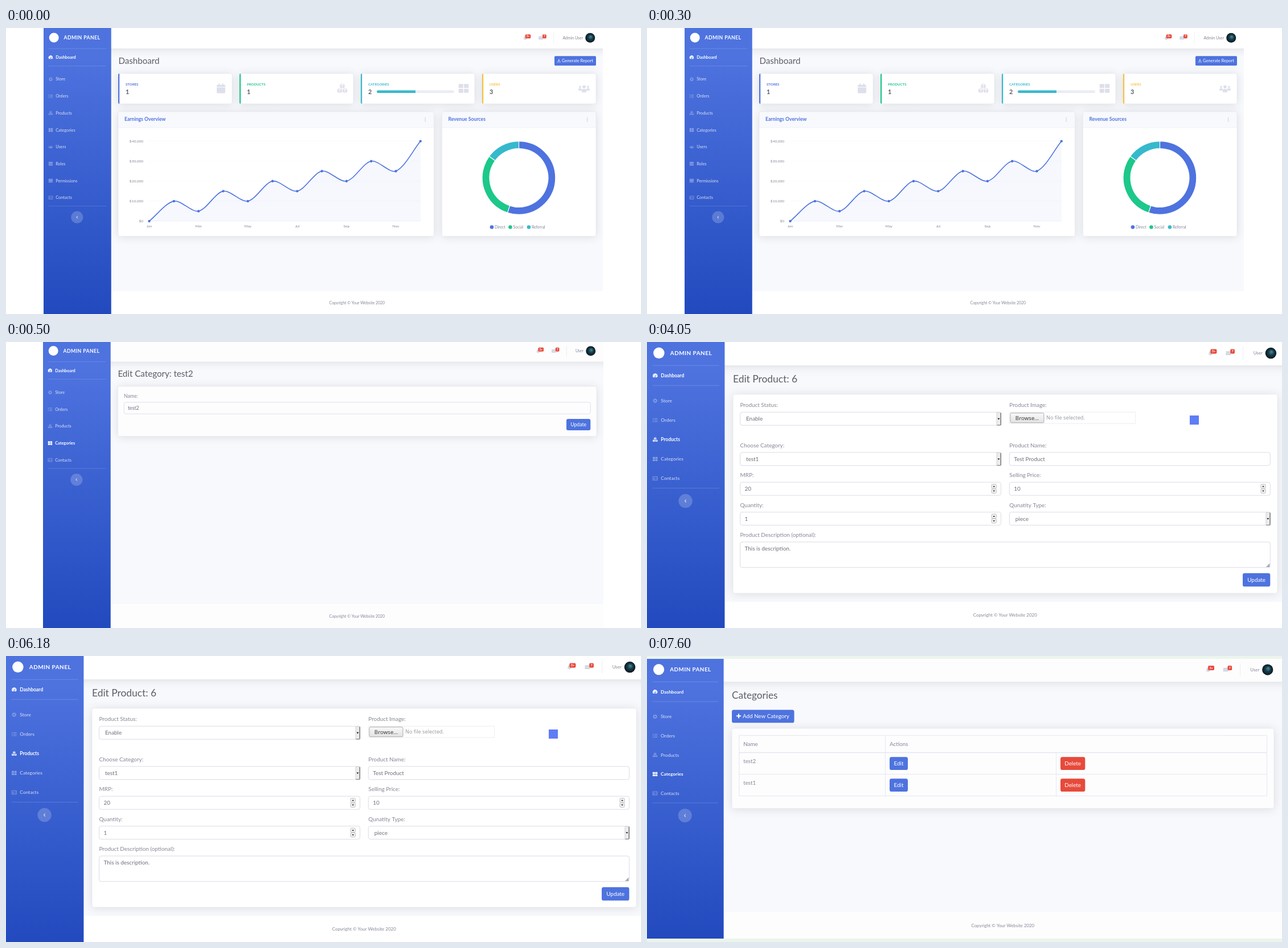
Write an HTML page with a canvas that moves like this. It is 1115 px wide and 502 px high and loops after 8 s.

```html
<!DOCTYPE html>
<html lang="en">
<head>
<meta charset="utf-8">
<title>Admin panel tour</title>
<style>
html, body { margin: 0; width: 100%; height: 100%; overflow: hidden; background: #fff; }
canvas { display: block; width: 1115px; height: 502px; }
</style>
</head>
<body>
<canvas id="stage"></canvas>
<script>
const W = 1115, H = 502, LOOP = 8000;
const BLUE = '#4e73df', GREEN = '#1cc88a', TEAL = '#36b9cc', YELLOW = '#f6c23e', RED = '#e74a3b';
const GREY = '#858796', DARK = '#5a5c69', FIELD = '#6e707e', LINE = '#e3e6f0', EDGE = '#d1d3e2', PALE = '#f8f9fc', ICON = '#dddfeb';
const FONT = 'Lato, "Open Sans", sans-serif';

const canvas = document.getElementById('stage');
const ctx = canvas.getContext('2d');
const dpr = window.devicePixelRatio || 1;
canvas.width = W * dpr;
canvas.height = H * dpr;

function text(str, x, y, size, color, { weight = 400, align = 'left', font = FONT, spacing = 0 } = {}) {
  ctx.font = `${weight} ${size * 1.02}px ${font}`;
  ctx.letterSpacing = spacing + 'px';
  ctx.textAlign = align;
  ctx.fillStyle = color;
  ctx.fillText(str, x, y + size * 0.35);
}

function rect(x, y, x2, y2, color) {
  ctx.fillStyle = color;
  ctx.fillRect(x, y, x2 - x, y2 - y);
}

function box(x, y, x2, y2, r, fill, stroke, width = 0.8) {
  ctx.beginPath();
  ctx.roundRect(x, y, x2 - x, y2 - y, r);
  if (fill) { ctx.fillStyle = fill; ctx.fill(); }
  if (stroke) { ctx.strokeStyle = stroke; ctx.lineWidth = width; ctx.stroke(); }
}

function line(x, y, x2, y2, color, width = 1) {
  ctx.beginPath();
  ctx.moveTo(x, y);
  ctx.lineTo(x2, y2);
  ctx.strokeStyle = color;
  ctx.lineWidth = width;
  ctx.stroke();
}

function dot(x, y, r, color) {
  ctx.beginPath();
  ctx.arc(x, y, r, 0, 7);
  ctx.fillStyle = color;
  ctx.fill();
}

function poly(color, ...p) {
  ctx.beginPath();
  for (let i = 0; i < p.length; i += 2) ctx.lineTo(p[i], p[i + 1]);
  ctx.closePath();
  ctx.fillStyle = color;
  ctx.fill();
}

function shadowed(s, draw) {
  ctx.save();
  ctx.shadowColor = 'rgba(58,59,69,0.15)';
  ctx.shadowBlur = 28 * s * dpr;
  ctx.shadowOffsetY = 2.4 * s * dpr;
  draw();
  ctx.restore();
}

function card(x, y, x2, y2, s, paper) {
  shadowed(s, () => box(x, y, x2, y2, 5.6 * s, paper));
  box(x, y, x2, y2, 5.6 * s, null, LINE, s);
}

// Icons live in a 16-unit box centred on the origin.
function person(c, x, y, k) {
  dot(x, y - 3 * k, 2.6 * k, c);
  box(x - 4 * k, y + 0.5 * k, x + 4 * k, y + 6 * k, [3 * k, 3 * k, k, k], c);
}

function cube(c, x, y) {
  poly(c, x - 3.8, y - 1.6, x - 0.4, y, x - 0.4, y + 4, x - 3.8, y + 2.3);
  poly(c, x + 3.8, y - 1.6, x + 0.4, y, x + 0.4, y + 4, x + 3.8, y + 2.3);
  ctx.beginPath();
  ctx.moveTo(x - 3.3, y - 2);
  ctx.lineTo(x, y - 3.5);
  ctx.lineTo(x + 3.3, y - 2);
  ctx.lineTo(x, y - 0.6);
  ctx.closePath();
  ctx.strokeStyle = c;
  ctx.lineWidth = 0.9;
  ctx.stroke();
}

const icons = {
  gauge(c) {
    ctx.beginPath();
    ctx.arc(0, 1, 8, 2.5, 0.64);
    ctx.closePath();
    ctx.fillStyle = c;
    ctx.fill();
    line(0, 3, 3, -3, BLUE, 1.6);
    dot(0, 3, 2, BLUE);
    dot(-5, 1, 1, BLUE);
    dot(-2.5, -3.5, 1, BLUE);
    dot(5.5, 1, 1, BLUE);
  },
  gear(c) {
    ctx.beginPath();
    ctx.arc(0, 0, 4.2, 0, 7);
    ctx.strokeStyle = c;
    ctx.lineWidth = 2.4;
    ctx.stroke();
    for (let i = 0; i < 8; i++) {
      const a = i * Math.PI / 4, u = Math.cos(a), v = Math.sin(a);
      line(u * 5.4, v * 5.4, u * 7.6, v * 7.6, c, 2.4);
    }
  },
  list(c) {
    for (const y of [-5, 0, 5]) {
      rect(-8, y - 1.3, -5.4, y + 1.3, c);
      rect(-3, y - 0.9, 8, y + 0.9, c);
    }
  },
  cubes(c) {
    cube(c, 0, -4);
    cube(c, -4.2, 3.4);
    cube(c, 4.2, 3.4);
  },
  grid(c) {
    for (const x of [-8, 0.6]) for (const y of [-7, 0.6]) box(x, y, x + 7.4, y + 6.4, 0.6, c);
  },
  users(c) {
    person(c, -7, -0.5, 0.72);
    person(c, 7, -0.5, 0.72);
    person(c, 0, 0.5, 1.05);
  },
  server(c) {
    for (const y of [-7, -2, 3]) {
      box(-8, y, 8, y + 4, 0.8, c);
      dot(5.4, y + 2, 0.8, BLUE);
    }
  },
  card(c) {
    box(-8, -6, 8, 6, 1, null, c, 1.6);
    dot(-3.5, -1.2, 1.9, c);
    rect(-6, 1.4, -1, 3.6, c);
    for (const y of [-3, 0, 3]) rect(1.5, y - 0.6, 6, y + 0.6, c);
  },
  bell(c) {
    box(-5, -6.5, 5, 4, [5, 5, 0, 0], c);
    box(-7, 3, 7, 5, 1, c);
    dot(0, 6, 1.8, c);
  },
  mail(c) {
    box(-8, -6, 8, 6, 1.2, c);
    line(-8, -3, 0, 2, '#fff', 1);
    line(0, 2, 8, -3, '#fff', 1);
  },
  calendar(c) {
    box(-7, -6, 7, -2.4, [1.4, 1.4, 0, 0], c);
    box(-7, -1.5, 7, 8, [0, 0, 1.4, 1.4], c);
    rect(-4, -8, -2, -5, c);
    rect(2, -8, 4, -5, c);
  },
  download(c) {
    rect(-1.6, -8, 1.6, -2, c);
    poly(c, -5.5, -2.5, 5.5, -2.5, 0, 3);
    box(-7.2, 2.5, 7.2, 7, 1, null, c, 1.6);
  },
  plus(c) {
    box(-7, -1.7, 7, 1.7, 0.8, c);
    box(-1.7, -7, 1.7, 7, 0.8, c);
  }
};

function icon(name, x, y, size, color) {
  ctx.save();
  ctx.translate(x, y);
  ctx.scale(size / 16, size / 16);
  icons[name](color);
  ctx.restore();
}

function button(x, y, x2, y2, label, size, color = BLUE) {
  box(x, y, x2, y2, size * 0.35, color);
  text(label, (x + x2) / 2, (y + y2) / 2, size, '#fff', { align: 'center' });
}

const MENU = {
  Store: 'gear', Orders: 'list', Products: 'cubes', Categories: 'grid', Users: 'users',
  Roles: 'server', Permissions: 'server', Contacts: 'card'
};
const SHORT = ['Store', 'Orders', 'Products', 'Categories', 'Contacts'];

function sidebar(p) {
  const { x, y, s } = p;
  const g = ctx.createLinearGradient(0, p.top, 0, p.bottom);
  g.addColorStop(0.1, BLUE);
  g.addColorStop(1, '#224abe');
  rect(x, p.top, x + 224 * s, p.bottom, g);

  ctx.save();
  ctx.translate(x, y);
  ctx.scale(s, s);
  const rule = v => line(16, v, 208, v, 'rgba(255,255,255,0.2)', 1.4);
  const item = (label, name, v, on) => {
    icon(name, 23.5, v, name === 'users' ? 11.5 : 14, on ? '#fff' : 'rgba(255,255,255,0.36)');
    text(label, 40, v, 13.6, on ? '#fff' : 'rgba(255,255,255,0.8)', { weight: on ? 700 : 400 });
  };
  dot(34.3, 34.5, 16, '#fff');
  text('ADMIN PANEL', 67, 34.5, 16, '#fff', { weight: 700, spacing: 0.8 });
  rule(70.5);
  item('Dashboard', 'gauge', 99.5, true);
  rule(128);
  p.items.forEach((label, i) => item(label, MENU[label], 172 + 56 * i, label === p.active));
  const end = 172 + 56 * (p.items.length - 1);
  rule(end + 28);
  dot(111, end + 65, 20, 'rgba(255,255,255,0.2)');
  line(113, end + 61, 109, end + 65, 'rgba(255,255,255,0.65)', 2);
  line(109, end + 65, 113, end + 69, 'rgba(255,255,255,0.65)', 2);
  ctx.restore();
}

function topbar(p) {
  const { y, s } = p;
  shadowed(s, () => rect(p.x, p.top, p.right + 30, y + 70 * s, p.paper));
  ctx.save();
  ctx.translate(p.right - 42 * s, y);
  ctx.scale(s, s);
  const g = ctx.createRadialGradient(2, 31, 1, 0, 35, 16);
  g.addColorStop(0, '#3f8793');
  g.addColorStop(0.45, '#183c48');
  g.addColorStop(1, '#0a1620');
  dot(0, 35, 16, g);
  text(p.user, -24, 35, 12.8, GREY, { align: 'right' });
  const shift = p.user === 'User' ? 0 : -41;
  line(shift - 80, 16, shift - 80, 53, LINE, 1.2);
  const alert = (name, at, badge, off, half) => {
    icon(name, at, 35, 14.5, EDGE);
    box(at + off - half, 23.5, at + off + half, 36.5, 3, RED);
    text(badge, at + off, 30, 9, '#fff', { weight: 700, align: 'center' });
  };
  alert('bell', shift - 174, '3+', 9, 9);
  alert('mail', shift - 122.5, '7', 12, 6.3);
  ctx.restore();
}

function page(p, content) {
  ctx.save();
  ctx.beginPath();
  ctx.rect(p.x, p.top, p.right - p.x, p.bottom - p.top);
  ctx.clip();
  rect(p.x, p.top, p.right, p.bottom, PALE);
  topbar(p);
  const left = p.x + 224 * p.s;
  text(p.title, left + 24 * p.s, p.titleY, 28 * p.s, DARK);
  content(p);
  rect(left, p.footer, p.right, p.bottom, p.paper);
  text('Copyright © Your Website 2020', (left + p.right) / 2, p.footY, 12.8 * p.s, GREY, { align: 'center' });
  sidebar(p);
  ctx.restore();
}

function stat(x, color, label, value, name, size) {
  card(x, 80, x + 200, 133, 0.53, '#fff');
  box(x, 80, x + 2.2, 133, [2.5, 0, 0, 2.5], color);
  text(label, x + 13, 99, 5.95, color, { weight: 700 });
  text(value, x + 13, 112, 10.6, DARK, { weight: 700 });
  icon(name, x + 180.5 - (name === 'users' ? 1.5 : 0), 106, size, ICON);
}

function panel(x, x2, title) {
  card(x, 147, x2, 365.5, 0.53, '#fff');
  box(x, 147, x2, 175, [3, 3, 0, 0], PALE, LINE, 0.5);
  text(title, x + 11, 160.5, 8.5, BLUE, { weight: 700 });
  for (const d of [-2.8, 0, 2.8]) dot(x2 - 15.3, 160.7 + d, 1, EDGE);
}

function earnings() {
  const base = 339, top = 198.5, left = 251.5;
  for (let i = 0; i < 5; i++) {
    const y = base - 35.1 * i;
    ctx.setLineDash(i ? [1, 1] : []);
    line(left, y, 728, y, '#eaecf4', 0.6);
    ctx.setLineDash([]);
    text(i ? `$${i}0,000` : '$0', 241, y - 0.3, 6.4, GREY, { align: 'right' });
  }
  ['Jan', 'Mar', 'May', 'Jul', 'Sep', 'Nov'].forEach((m, i) =>
    text(m, left + 86.6 * i, 348, 6.4, GREY, { align: 'center' }));

  const pts = [0, 10, 5, 15, 10, 20, 15, 25, 20, 30, 25, 40]
    .map((v, i) => ({ x: left + 43.3 * i, y: base - 3.51 * v }));
  const clampY = y => Math.min(base, Math.max(top, y));
  const handles = pts.map((p, i) => {
    const a = pts[i - 1] || p, b = pts[i + 1] || p;
    const d1 = Math.hypot(p.x - a.x, p.y - a.y), d2 = Math.hypot(b.x - p.x, b.y - p.y);
    const at = k => [p.x + k * (b.x - a.x), clampY(p.y + k * (b.y - a.y))];
    return { before: at(-0.3 * d1 / (d1 + d2)), after: at(0.3 * d2 / (d1 + d2)) };
  });
  const curve = new Path2D();
  curve.moveTo(pts[0].x, pts[0].y);
  for (let i = 1; i < pts.length; i++) {
    curve.bezierCurveTo(...handles[i - 1].after, ...handles[i].before, pts[i].x, pts[i].y);
  }
  const area = new Path2D(curve);
  area.lineTo(pts[11].x, base);
  area.closePath();
  ctx.fillStyle = 'rgba(78,115,223,0.05)';
  ctx.fill(area);
  ctx.strokeStyle = BLUE;
  ctx.lineWidth = 1.6;
  ctx.stroke(curve);
  for (const p of pts) dot(p.x, p.y, 2.2, BLUE);
}

function revenue() {
  let from = -Math.PI / 2;
  for (const [share, color] of [[0.55, BLUE], [0.3, GREEN], [0.15, TEAL]]) {
    const to = from + share * 2 * Math.PI;
    ctx.beginPath();
    ctx.arc(900.5, 263, 64.3, from, to);
    ctx.arc(900.5, 263, 51.4, to, from, true);
    ctx.closePath();
    ctx.fillStyle = color;
    ctx.fill();
    ctx.strokeStyle = '#fff';
    ctx.lineWidth = 1.1;
    ctx.stroke();
    from = to;
  }
  [['Direct', BLUE, 853], ['Social', GREEN, 885.5], ['Referral', TEAL, 918]].forEach(([name, color, x]) => {
    dot(x, 349.5, 3.3, color);
    text(name, x + 5, 349.5, 6.8, GREY);
  });
}

function dashboard() {
  box(963, 49.3, 1036, 66, 1.8, BLUE);
  icon('download', 970.8, 57.6, 6.4, 'rgba(255,255,255,0.6)');
  text('Generate Report', 976, 57.6, 7.4, '#fff');
  stat(197, BLUE, 'STORES', '1', 'calendar', 17);
  stat(410, GREEN, 'PRODUCTS', '1', 'cubes', 17.5);
  stat(623, TEAL, 'CATEGORIES', '2', 'grid', 17.5);
  stat(836, YELLOW, 'USERS', '3', 'users', 16);
  box(651, 109.6, 787, 114, 2.2, '#eaecf4');
  box(651, 109.6, 719, 114, [2.2, 0, 0, 2.2], TEAL);
  panel(197, 751.5, 'Earnings Overview');
  panel(765.5, 1036, 'Revenue Sources');
  earnings();
  revenue();
}

function editCategory(p) {
  card(196.5, 78, 1037, 165.5, p.s, p.paper);
  text('Name:', 207, 95, 8.5, GREY);
  box(207.3, 105.8, 1026.3, 126.2, 2.8, p.paper, EDGE, 0.7);
  text('test2', 214, 116, 8.5, FIELD);
  button(984, 135, 1026.3, 155, 'Update', 8.5);
}

const SIZE = 9.74;

function input(label, value, x, y, { kind = 'text', h = 23 } = {}) {
  const x2 = x + 458;
  text(label, x, y - 12.3, SIZE, GREY);
  box(x, y, x2, y + h, 3.4, '#fff', EDGE);
  const select = kind === 'select';
  text(value, x + (select ? 10.5 : 8), y + 11.5, SIZE, FIELD);
  if (select) {
    box(x2 - 7.5, y + 0.5, x2 - 0.3, y + h - 0.3, 1, '#ececec', '#c8c8c8', 0.7);
    line(x2 - 0.3, y + 1, x2 - 0.3, y + h - 0.5, '#55565c', 1.1);
    line(x2 - 7, y + h - 0.3, x2 - 0.3, y + h - 0.3, '#77787e', 1);
    poly('#111', x2 - 6, y + 10.6, x2 - 2, y + 10.6, x2 - 4, y + 13.2);
  }
  if (kind === 'number') {
    for (const [dy, dir] of [[3.5, -1], [11.6, 1]]) {
      box(x2 - 16.3, y + dy, x2 - 8.3, y + dy + 7.6, 1.6, '#f6f6f6', '#aaa', 0.8);
      const mid = y + dy + 3.8;
      poly('#333', x2 - 14.3, mid - dir, x2 - 10.3, mid - dir, x2 - 12.3, mid + dir * 1.4);
    }
  }
}

function editProduct(p) {
  const L = 163.5, R = 636.3, ui = { font: '"Open Sans", "Noto Sans", sans-serif' };
  card(151, 91.7, 1107, 441, p.s, p.paper);
  input('Product Status:', 'Enable', L, 123.2, { kind: 'select' });
  input('Choose Category:', 'test1', L, 193.8, { kind: 'select' });
  input('Product Name:', 'Test Product', R, 193.8);
  input('MRP:', '20', L, 246.2, { kind: 'number' });
  input('Selling Price:', '10', R, 246.2, { kind: 'number' });
  input('Quantity:', '1', L, 298.6, { kind: 'number' });
  input('Qunatity Type:', 'piece', R, 298.6, { kind: 'select' });

  text('Product Image:', R, 110.9, SIZE, GREY);
  box(R, 123.2, 857.7, 143, 0.5, '#fff', '#e6e7ec');
  const g = ctx.createLinearGradient(0, 124, 0, 142);
  g.addColorStop(0, '#fafafa');
  g.addColorStop(1, '#e2e2e2');
  box(638, 124.7, 697, 141.7, 2, g, '#a5a5a8', 0.9);
  text('Browse…', 667.5, 133.2, 9.6, '#2d2f33', { align: 'center', ...ui });
  text('No file selected.', 701, 133.2, 9, '#92959d', ui);
  rect(953, 129, 969, 145, '#5f7df5');

  text('Product Description (optional):', L, 338.6, SIZE, GREY);
  box(L, 351, R + 458, 395.8, 3.4, '#fff', EDGE);
  text('This is description.', L + 8, 362.5, SIZE, FIELD);
  poly('#a9abb3', 1093.3, 388.5, 1093.3, 395, 1086.8, 395);
  button(1046, 405.7, 1094.3, 429.3, 'Update', SIZE);
}

function categories(p) {
  const size = 16 * p.s, x = 161.8, x2 = 1088.5;
  box(149, 94.4, 258.5, 117.3, 3.4, BLUE);
  icon('plus', 161, 105.3, 9.3, '#fff');
  text('Add New Category', 168, 105.8, size, '#fff');
  card(149, 127, 1101, 267.5, p.s, p.paper);
  for (const y of [139.4, 169.4, 207.6, 245.6]) line(x, y, x2, y, LINE, y === 169.4 ? 1.5 : 0.9);
  for (const v of [x, 418.5, x2]) line(v, 139.4, v, 245.6, LINE, 0.9);
  line(718.5, 169.4, 718.5, 245.6, LINE, 0.9);
  text('Name', 169.2, 154.5, size, GREY);
  text('Actions', 426, 154.5, size, GREY);
  ['test2', 'test1'].forEach((name, i) => {
    const y = 177.3 + 38 * i;
    text(name, 169.2, y + 7.2, size, GREY);
    button(426, y, 458, y + 22.8, 'Edit', size);
    button(726, y, 769.3, y + 22.8, 'Delete', size, RED);
  });
}

const base = { top: 0, bottom: H, user: 'User', items: SHORT, paper: '#fff' };
const scenes = [
  { ...base, start: 0, x: 66, y: -1.2, s: 0.53, right: 1048, footer: 462, footY: 482.5,
    title: 'Dashboard', titleY: 57.5, user: 'Admin User', items: Object.keys(MENU), draw: dashboard },
  { ...base, start: 500, x: 65, y: -2.7, s: 0.53, right: 1049, footer: 460, footY: 482, paper: '#fdfdfe',
    title: 'Edit Category: test2', titleY: 55.5, active: 'Categories', draw: editCategory },
  { ...base, start: 4050, x: 0, y: -1.7, s: 0.609, right: 1121, footer: 456.3, footY: 479,
    title: 'Edit Product: 6', titleY: 65.5, active: 'Products', draw: editProduct },
  { ...base, start: 7600, x: 0, y: 3, s: 0.601, right: 1115, top: 5, bottom: 496, footer: 449.5, footY: 473.5,
    paper: '#fdfdfe', back: '#ebf5ec', title: 'Categories', titleY: 69.5, active: 'Categories', draw: categories }
];

let shown = null;
function tick() {
  const t = performance.now() % LOOP;
  const scene = scenes.findLast(p => t >= p.start);
  if (scene !== shown) {
    shown = scene;
    ctx.setTransform(dpr, 0, 0, dpr, 0, 0);
    rect(0, 0, W, H, scene.back || '#fff');
    page(scene, scene.draw);
  }
  requestAnimationFrame(tick);
}
tick();
</script>
</body>
</html>
```
